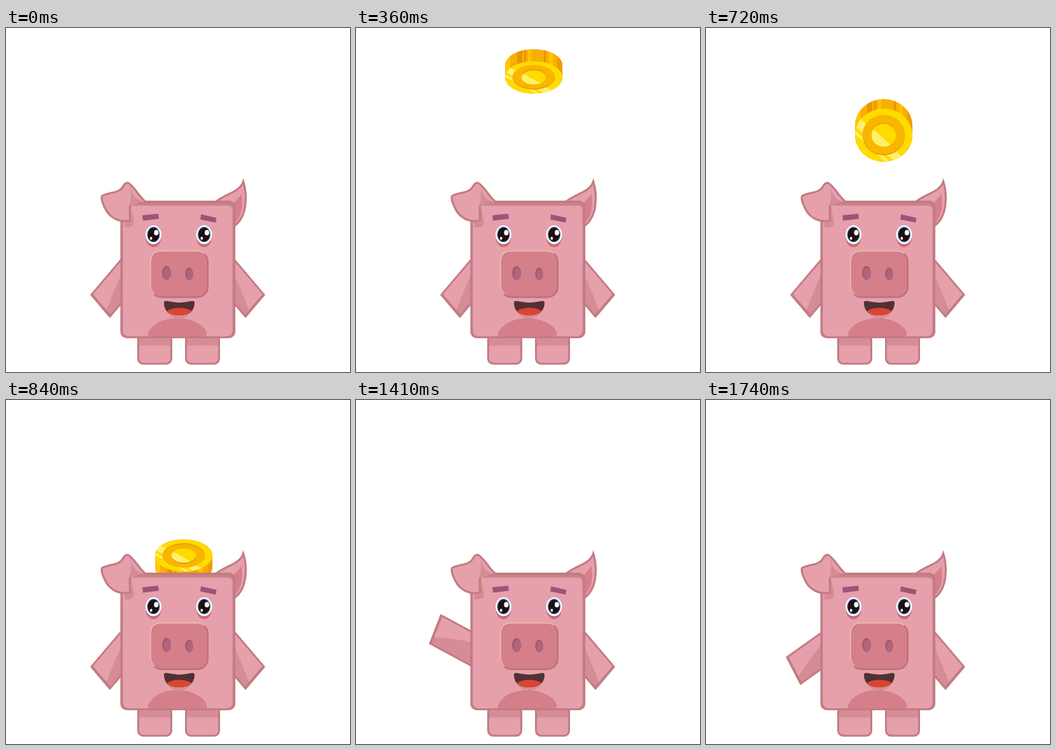
Animation of 540x540 px, one loop 1.77 s. Source, as an HTML page with a canvas:

```html
<!DOCTYPE html>
<html lang="en">
<head>
<meta charset="utf-8">
<title>Piggy and coin</title>
<style>
html, body { margin: 0; width: 100%; height: 100%; overflow: hidden; background: #fff; }
canvas { display: block; width: 100%; height: 100%; }
</style>
</head>
<body>
<canvas id="stage" width="540" height="540"></canvas>
<script>
const ctx = document.getElementById('stage').getContext('2d');
const LOOP = 1770, TICK = 30;
const SKIN = '#e6a0ac', SHADE = '#d58c97', DEEP = '#d57f8a', LINE = '#c27c82';
const GOLD = '#ffdb00', AMBER = '#f8b600', RUST = '#eb9f00', PALE = '#fff06c';
const rad = d => d * Math.PI / 180;

function paint(fill, stroke, width = 3) {
  if (fill) { ctx.fillStyle = fill; ctx.fill(); }
  if (stroke) { ctx.strokeStyle = stroke; ctx.lineWidth = width; ctx.stroke(); }
}
function shape(d, fill, stroke, width = 3) {
  const p = new Path2D(d);
  if (fill) { ctx.fillStyle = fill; ctx.fill(p); }
  if (stroke) { ctx.strokeStyle = stroke; ctx.lineWidth = width; ctx.stroke(p); }
}
function oval(x, y, rx, ry, fill, stroke, width) {
  ctx.beginPath();
  ctx.ellipse(x, y, rx, ry, 0, 0, Math.PI * 2);
  paint(fill, stroke, width);
}
function box(x, y, w, h, r, fill, stroke, width) {
  ctx.beginPath();
  ctx.roundRect(x, y, w, h, r);
  paint(fill, stroke, width);
}
function scoped(fn) { ctx.save(); fn(); ctx.restore(); }

// Diagonal gloss across a coin face, lines of y = 1.3x + v
function gloss(v0, v1) {
  const a = 60, s = 1.3 * a;
  shape(`M${-a} ${v0 - s}L${a} ${v0 + s}L${a} ${v1 + s}L${-a} ${v1 - s}Z`, PALE);
}

// sink: how far the recessed ring shifts when the coin is tilted
function coinFace(sink) {
  oval(0, 0, 45, 60, GOLD);
  ctx.clip();
  gloss(11, 37);
  gloss(48, 56);
  oval(0, 0, 33.5, 45.5, RUST);
  scoped(() => {
    ctx.clip();
    oval(0, sink, 33.5, 45.5, AMBER);
    oval(0, sink, 19, 26, RUST);
  });
  oval(0, 0, 19, 26, GOLD);
  ctx.clip();
  gloss(8, 40);
}

function coin(y, angle) {
  const c = Math.cos(angle), squash = Math.max(Math.abs(c), 0.01);
  const half = 10.5 * Math.sin(angle) * (c < 0 ? 1 : -1);
  const ry = 60 * squash;
  scoped(() => {
    ctx.translate(279, y);
    scoped(() => {
      ctx.beginPath();
      ctx.ellipse(0, -Math.abs(half), 45, ry, 0, Math.PI, 0);
      ctx.ellipse(0, Math.abs(half), 45, ry, 0, 0, Math.PI);
      ctx.closePath();
      paint('#f8ae03');
      ctx.clip();
      const bar = (x, w, col) => { ctx.fillStyle = col; ctx.fillRect(x, -75, w, 150); };
      bar(-45, 8, '#ffc800');
      bar(-26, 8, '#e79600');
      bar(-15, 3, '#e79600');
      bar(-9, 5, '#ffc400');
      bar(16, 3, '#e79600');
      bar(24, 6, '#ffc400');
      bar(37, 8, '#ee9d00');
    });
    ctx.translate(0, half);
    ctx.scale(1, squash);
    coinFace(-half * 0.22 / squash);
  });
}

function arm(side, lift) {
  scoped(() => {
    ctx.translate(269.5 - side * 86.5, 378);
    ctx.scale(side * 0.85, 1);
    ctx.rotate(rad(lift - 45));
    shape('M-70 -12H25V36.5H-70Z', SKIN);
    shape('M-70 26Q-35 12 -2 3L25 0V36.5H-70Z', SHADE);
    shape('M25 -12H-69.5V36.5H25', null, LINE, 3.2);
    shape('M-69 -12V36.5', null, LINE, 4.4);
  });
}

function leg(x) {
  box(x + 2, 480, 52, 47, 8, SKIN);
  ctx.fillStyle = SHADE;
  ctx.fillRect(x + 2, 484, 52, 14.5);
  box(x + 2, 480, 52, 47, 8, null, LINE, 3);
}

function eye(x, shut) {
  oval(x, 329.5, 11.8, 14.5, '#c56d78');
  if (shut) {
    oval(x, 327, 12, 13.5, '#eeb4b9');
    oval(x, 324, 13, 14.8, DEEP);
    shape(`M${x - 12} 329Q${x} 334 ${x + 12} 329Q${x + 9} 339 ${x} 339Q${x - 9} 339 ${x - 12} 329Z`, '#c56d78');
    shape(`M${x - 12} 328Q${x} 334 ${x + 12} 328`, null, '#efbcc0', 1.2);
    return;
  }
  oval(x, 324.5, 12.4, 14.8, '#fff');
  oval(x, 324.2, 10, 12.1, '#2f6f9f');
  oval(x, 324.4, 8.8, 10.8, '#210d10');
  oval(x + 4.4, 321.2, 3.5, 4.3, '#fff');
  oval(x - 3.7, 330.2, 1.8, 2.4, '#fff');
}

function ears() {
  shape('M329 273C346 259 367 258 372.500 241C378.500 260 380 296 358 311Z', SKIN, LINE, 3.2);
  shape('M355 278C361 270 367 266 369.500 260C372 278 371 295 358 308Z', DEEP);
}

function foldedEar() {
  shape('M186 275H196C197 290 201 298 201 306Q200 313 191 313H186Z', SHADE);
  shape('M191 243L218 273H195Z', SKIN);
  shape('M194 246C198 258 200 268 214 272L195 280Z', SHADE);
  shape('M191 243C201 248 206 261 218 272', null, LINE, 3.2);
  shape('M150.500 264C160 257 178 261 184 248Q188 241 193 244C199 258 195 268 194.500 280Q194 294 195 302C178 306 163 298 156 284C152 276 149 268 150.500 264Z', SKIN);
  shape('M193 244Q188 241 184 248C178 261 160 257 150.500 264C149 268 152 276 156 284C163 298 178 306 195 302Q194 294 194.500 278', null, LINE, 3.2);
}

function snout() {
  box(227.500, 350.500, 89, 72, 16, DEEP, '#c4737d', 3);
  shape('M233 418Q227 413 227 404V367Q227 350 244 350H300Q307 350 311 354', null, '#ebb2a8', 2.4);
  const nostril = (x, y, rx, ry) => {
    oval(x, y, rx, ry, '#a25b6e');
    oval(x + 1.2, y + 1.4, rx - 1.3, ry - 1.5, '#b0657a');
  };
  nostril(252, 384.5, 7, 11);
  nostril(287.500, 386, 6.2, 10);
}

function mouth() {
  shape('M249 440Q257 456 271.500 456Q287 456 295 440Z', '#d78c97');
  const lips = 'M248 431Q248 428 252 428.500C262 430 266 431 272 431C279 431 283 430 292 428.500Q296 428 296 431C296 445 286 451 272 451C257 451 248 445 248 431Z';
  scoped(() => {
    shape(lips, '#513133');
    ctx.clip(new Path2D(lips));
    oval(272, 449.5, 22, 10.3, '#db4530');
  });
}

function body() {
  box(179.500, 271, 180.500, 216, 10, LINE);
  box(183, 275, 173.500, 209, 7, '#cd828b');
  box(183.500, 279, 172, 205, [4, 6, 9, 9], SKIN);
  shape('M223 484V479C229 464 248 455.500 269 455.500C291 455.500 310 465 315 478V484Z', DEEP);
}

function face(shut) {
  shape('M214 294L239 291.500L240 299.500L215 302.500Z', '#9b5578');
  shape('M306 292.500L330.500 298L329 305.500L305 300.500Z', '#9b5578');
  eye(231.500, shut);
  eye(311, shut);
  snout();
  mouth();
}

function armLift(t) {
  const peak = 82;
  if (t <= 1080) return 0;
  if (t < 1590) return peak * Math.sin((t - 1080) / 510 * Math.PI / 2);
  return peak * (LOOP - t) / 180;
}

function draw(t) {
  ctx.fillStyle = '#fff';
  ctx.fillRect(0, 0, 540, 540);
  if (t >= 30 && t < 960) {
    const step = Math.floor((t - 30) / 46.36 + 0.001);
    coin(68 + Math.max(0, t - 600) * 0.773, rad(23 * (12 - step)));
  }
  ears();
  arm(1, armLift(t));
  arm(-1, 0);
  leg(205.500);
  leg(280.500);
  body();
  foldedEar();
  face(t >= 600 && t < 720);
}

const start = performance.now();
function frame() {
  const t = (performance.now() - start) % LOOP;
  draw(Math.floor(t / TICK) * TICK);
  requestAnimationFrame(frame);
}
frame();
</script>
</body>
</html>
```
